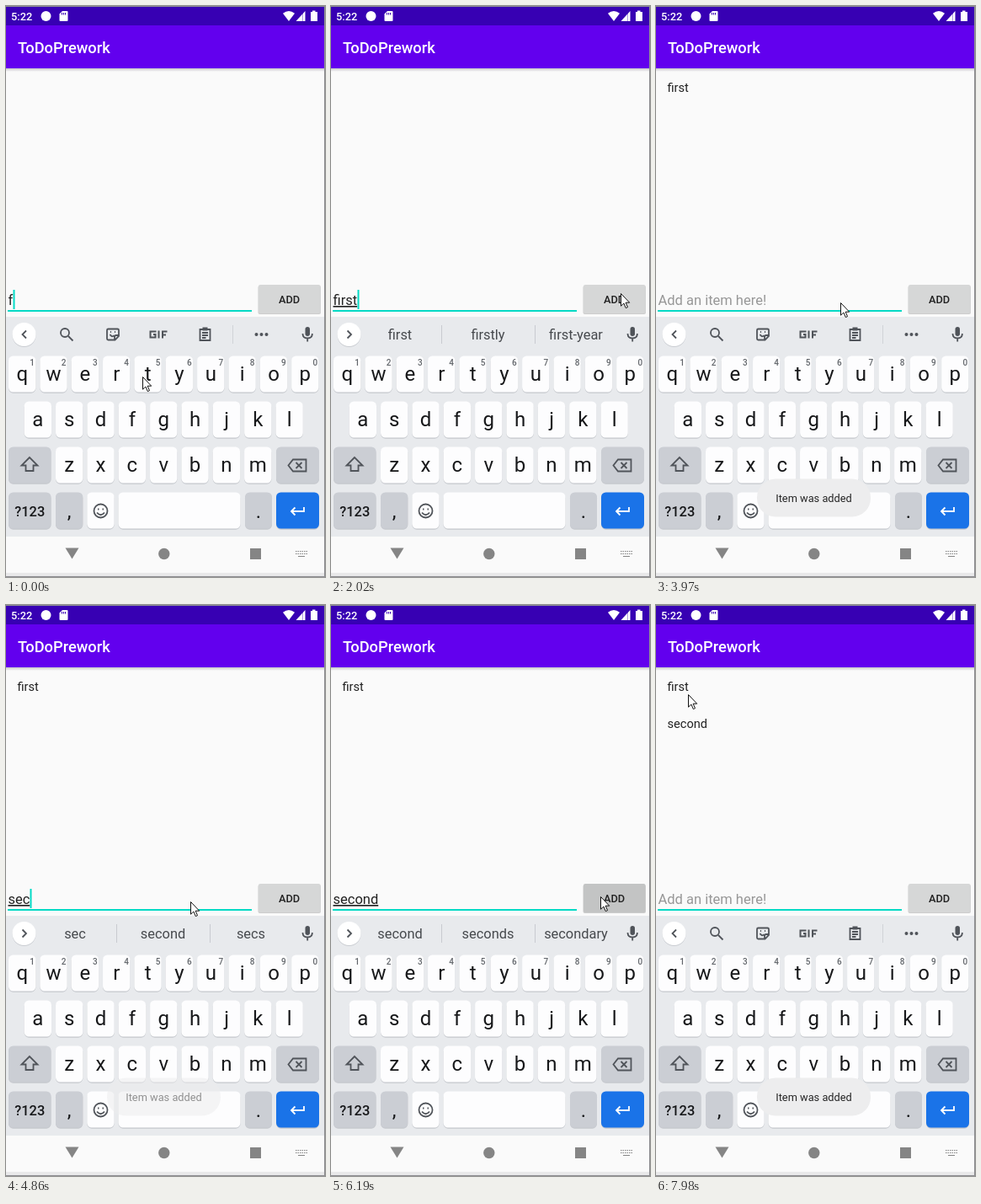
An HTML page that plays this animation: 379 px wide and 678 px high, repeating every 8 s.

```html
<!DOCTYPE html>
<html lang="en">
<head>
<meta charset="utf-8">
<title>To-do list</title>
<style>
  html, body { margin: 0; width: 100%; height: 100%; overflow: hidden; background: #fafafa; }
  svg { display: block; width: 379px; height: 678px; font-family: Roboto, sans-serif; }
  .medium { font-weight: 500; }
  .mid { text-anchor: middle; }
  .icon { fill: none; stroke: #50545a; stroke-width: 1.8; }
  .suggestion { font-size: 16.4px; fill: #46494d; text-anchor: middle; }
  .item { font-size: 14.6px; fill: #222; }
  .field { font-size: 16.5px; fill: #212121; }
</style>
</head>
<body>
<svg viewBox="0 0 379 678">
  <defs>
    <linearGradient id="shade" x2="0" y2="1">
      <stop stop-color="#000" stop-opacity=".2"/><stop offset="1" stop-color="#000" stop-opacity="0"/>
    </linearGradient>
  </defs>
  <rect width="379" height="678" fill="#fafafa"/>
  <rect y="74" width="378" height="4" fill="url(#shade)"/>

  <!-- status and app bars -->
  <rect width="378" height="23" fill="#3700b3"/>
  <rect y="23" width="378" height="51" fill="#6200ee"/>
  <g fill="#fff">
    <text x="6" y="17" font-size="12.8" class="medium">5:22</text>
    <circle cx="47.5" cy="12" r="6"/>
    <path d="M67 6h5.5q1 0 1 1v10q0 1-1 1h-8q-1 0-1-1V9.500z"/>
    <path d="M66.500 8v2.500m2-2.500v2.500m2-2.500v2.500" stroke="#3700b3"/>
    <path d="M329 8.800q7-5.600 14 0L336 18z"/>
    <path d="M355.500 6v12H344.500z"/>
    <path d="M352.500 8v10" stroke="#3700b3" stroke-opacity=".4"/>
    <path d="M364 5.500h3.500V7H370v11h-8V7h2z"/>
    <text x="14" y="55.500" font-size="18.3" class="medium">ToDoPrework</text>
  </g>

  <!-- list and entry row -->
  <text class="item" x="13.500" y="102" id="item1">first</text>
  <text class="item" x="13.500" y="146" id="item2">second</text>
  <text class="field" x="2.500" y="355" id="field"></text>
  <rect x="2" y="361" width="290" height="2" fill="#03dac5"/>
  <rect id="caret" y="337" width="2" height="23" fill="#03dac5"/>
  <rect x="299.500" y="332" width="74.500" height="34" rx="2" fill="#000" opacity=".18"/>
  <rect id="button" x="300" y="331" width="73.500" height="34" rx="2"/>
  <text class="medium mid" x="336.500" y="352.500" font-size="12.8" fill="#212121">ADD</text>

  <!-- keyboard -->
  <rect y="369" width="378" height="261" fill="#e8eaed"/>
  <circle cx="21.500" cy="391" r="14" fill="#c9ccd1"/>
  <circle cx="21.500" cy="390" r="14" fill="#fff"/>
  <path id="chevron" class="icon"/>
  <g id="tools" class="icon">
    <circle cx="70" cy="388" r="5"/><path d="M74 392l5.500 5.500"/>
    <path d="M121.500 383.500h11q1.500 0 1.500 1.500v7l-4.500 4.500h-8q-1.500 0-1.500-1.500v-10q0-1.500 1.500-1.500zM134 391h-3q-2 0-2 2v3M123.500 390q2.500 4 5 1M124 387h1m4 0h1"/>
    <path stroke-width="2" d="M177.500 387.500V386.500H171.500V393.500H177.500V390H175M181.500 385.500v9M186 394.500v-8h5.500M186 390.500h4"/>
    <path d="M230.500 384h12v13h-12zM233 388h7m-7 3h7m-7 3h4.500"/>
    <path d="M233.500 383.500h6" stroke-width="4"/>
    <g fill="#50545a" stroke="none"><circle cx="297.500" cy="390" r="2"/><circle cx="303.500" cy="390" r="2"/><circle cx="309.500" cy="390" r="2"/></g>
    <path d="M269.500 379v22" stroke="#d0d3d7" stroke-width="1"/>
  </g>
  <g id="strip">
    <path d="M131.500 379v22M242.500 379v22" stroke="#c8cbd0"/>
    <text class="suggestion" x="82" y="396"></text>
    <text class="suggestion" x="186.500" y="396"></text>
    <text class="suggestion" x="291" y="396"></text>
  </g>
  <rect x="355.500" y="381" width="5.500" height="11" rx="2.750" fill="#50545a"/>
  <path class="icon" stroke-width="1.500" d="M352.500 389q0 5.500 5.700 5.500t5.700-5.500M358.200 394.500v4"/>
  <g id="keys"></g>
  <g class="icon">
    <path d="M28 536l-9.500 9.500h5v6.500h9v-6.500h5z"/>
    <path d="M341 538.500h15.500v14H341l-5.500-7zM344.500 542l7 7m0-7l-7 7"/>
    <circle cx="112.500" cy="599.500" r="8"/>
    <path d="M108 601.500q4.500 5.500 9 0M109 597.500h1.500m4 0h1.500"/>
    <path d="M354 595v5h-15m4.500-4.500l-4.500 4.500 4.500 4.500" stroke="#fff"/>
  </g>

  <!-- navigation bar and window edge -->
  <rect y="630" width="378" height="43" fill="#fafafa"/>
  <rect y="673" width="378" height="4" fill="#e9e9ea"/>
  <g fill="#858585">
    <path d="M70.500 643.500h16L78.500 656.500z"/><circle cx="187.800" cy="650.500" r="6.700"/>
    <rect x="290" y="644" width="13" height="13"/>
    <path d="M344 647.500h14M344 650.500h14" stroke="#858585" stroke-dasharray="1.500 1"/>
    <path d="M347 653.500h8" stroke="#858585"/>
  </g>
  <path d="M0 .500H379M378.500 0V678M0 677.500H379" stroke="#8e8e92"/>

  <g id="toast">
    <rect x="120" y="561.500" width="135" height="45" rx="22" fill="#ededee"/>
    <text class="mid" x="187.500" y="589" font-size="12.8" fill="#262626">Item was added</text>
  </g>
  <path id="pointer" d="M.5.500v14.700l3.400-3.200 2.400 5.600 2.200-1-2.400-5.400h4.600z" fill="#fff" stroke="#111"/>
</svg>
<script>
const LOOP = 8000, STEP = 130, PITCH = 37.35;
const $ = id => document.getElementById(id);

function key(x, y, w, fill = '#fdfdfe') {
  return `<rect x="${x}" y="${y + 1.2}" width="${w}" height="43" rx="5.500" fill="#c5c8cd"/>
    <rect x="${x}" y="${y}" width="${w}" height="43" rx="5.500" fill="${fill}"/>`;
}
function label(x, y, text, size = 24, extra = '') {
  return `<text class="mid ${extra}" x="${x}" y="${y}" font-size="${size}" fill="#17181a">${text}</text>`;
}
function buildKeys() {
  const gray = '#cbced4';
  let out = '';
  [['qwertyuiop', 3], ['asdfghjkl', 21.7], ['zxcvbnm', 59]].forEach(([letters, left], row) => {
    [...letters].forEach((letter, i) => {
      const x = left + i * PITCH, y = 415.5 + row * 54;
      out += key(x, y, 32.3) + label(x + 16.2, y + 29.5, letter);
      if (!row) out += `<text class="medium" text-anchor="end" x="${x + 31}" y="426.500" font-size="10" fill="#62666b">${(i + 1) % 10}</text>`;
    });
  });
  out += key(3, 523.5, 50.5, gray) + key(321, 523.5, 51, gray);
  out += key(3, 577.5, 50.5, gray) + key(59, 577.5, 32.3, gray) + key(96.3, 577.5, 32.3);
  out += key(133.5, 577.5, 145, '#fdfdfe') + key(284, 577.5, 32, gray) + key(321, 577.5, 51, '#1a73e8');
  out += label(28.3, 605.5, '?123', 16.4, 'medium') + label(75, 608, ',') + label(300, 608, '.');
  $('keys').innerHTML = out;
}

// time, typed text, suggestions
const typing = [
  [0, 'f'], [150, 'fi'], [300, 'fi', 'fi first fit'], [430, 'fir', 'fir first fire'],
  [570, 'firs', 'firs first fir'], [1000, 'first', 'first firstly first-year'],
  [2710, ''], [4120, 's'], [4430, 'se'], [4860, 'sec', 'sec second secs'],
  [4980, 'seco', 'seco second seconds'], [5100, 'secon', 'secon second seconds'],
  [5220, 'second', 'secon second seconds'], [5640, 'second', 'second seconds secondary'], [6650, '']
];
const caret = [[0, 1], [1500, 0], [2020, 1], [2520, 0], [3420, 1], [3970, 0], [4120, 1],
  [5780, 0], [6340, 1], [6930, 0], [7350, 1], [7860, 0]];
const toast = [[0, 0], [2850, .4], [2990, .85], [3290, 1], [4860, .5], [4980, 0],
  [6650, .25], [6800, .7], [6930, 1]];
const press = [[0, 0], [2320, 1], [2580, 0], [6190, 1], [6340, 0]];
// time, x, y
const path = [[0, 162, 440], [870, 162, 440], [1880, 347, 331], [2020, 344, 341], [2450, 344, 341],
  [2990, 239, 362], [3290, 219, 352], [5360, 219, 352], [5500, 252, 350], [5920, 320, 346],
  [6800, 320, 346], [7610, 39, 107], [7980, 38, 106]];

const indexAt = (list, t) => list.findLastIndex(entry => entry[0] <= t);
const at = (list, t) => list[indexAt(list, t)];

function pointerAt(t) {
  const i = indexAt(path, t), [t0, x0, y0] = path[i], [t1, x1, y1] = path[i + 1] || [LOOP, x0, y0];
  const steps = Math.max(1, Math.round((t1 - t0) / STEP));
  const p = Math.floor((t - t0) / (t1 - t0) * steps) / steps;
  return [x0 + (x1 - x0) * p, y0 + (y1 - y0) * p].map(Math.round);
}

function render(t) {
  const [, text, words] = at(typing, t), field = $('field');
  field.textContent = text || 'Add an item here!';
  field.style.fill = text ? '' : '#979797';
  field.style.textDecoration = text.length > 1 ? 'underline' : 'none';
  $('caret').setAttribute('x', text ? 2.5 + Math.round(field.getComputedTextLength()) : 2);
  $('caret').style.opacity = at(caret, t)[1];

  $('tools').style.display = words ? 'none' : '';
  $('strip').style.display = words ? '' : 'none';
  $('chevron').setAttribute('d', words ? 'M19.500 385.500l4.500 4.500-4.500 4.500' : 'M24 385.500l-4.500 4.500 4.500 4.500');
  if (words) {
    const list = words.split(' ');
    document.querySelectorAll('.suggestion').forEach((node, i) => node.textContent = list[i]);
  }

  $('item1').style.opacity = +(t >= 2710);
  $('item2').style.opacity = +(t >= 6650);
  $('button').style.fill = at(press, t)[1] ? '#c3c4c4' : '#d6d7d7';
  $('toast').style.opacity = at(toast, t)[1];
  $('pointer').setAttribute('transform', `translate(${pointerAt(t)})`);
}

buildKeys();
render(0);
let start;
requestAnimationFrame(function tick(now) {
  start ??= now;
  render((now - start) % LOOP);
  requestAnimationFrame(tick);
});
</script>
</body>
</html>
```
